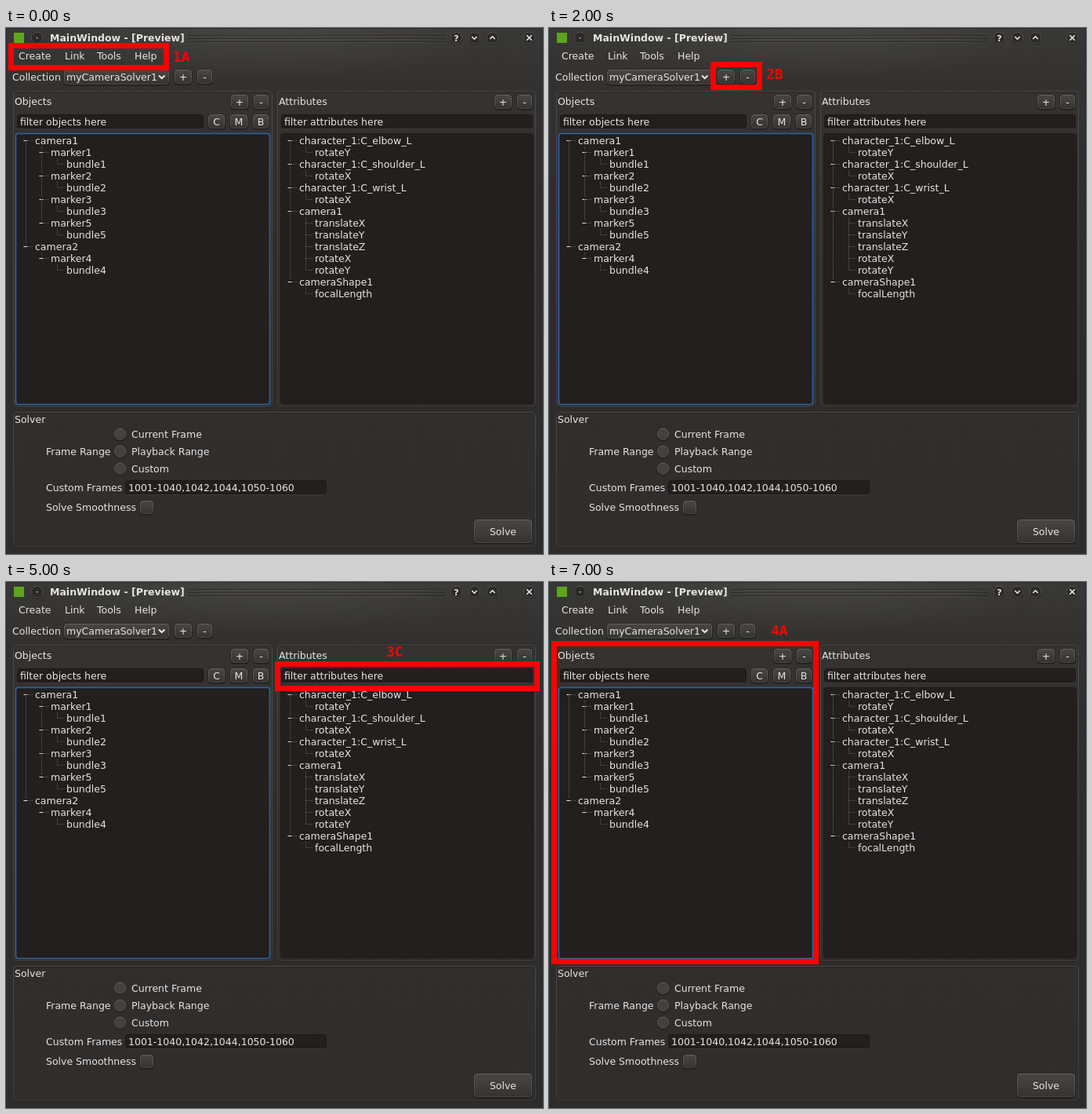
An HTML page for the animation above (8000 ms loop, 685x670 px).

```html
<!DOCTYPE html>
<html>
<head>
<meta charset="utf-8">
<style>
html, body { margin: 0; width: 100%; height: 100%; overflow: hidden; background: #2f2d2c; }
svg { display: block; width: 685px; height: 670px; }
text { font: 12.5px "DejaVu Sans", sans-serif; fill: #e6e5e4; white-space: pre; }
.title { font-weight: bold; }
.tag { font: bold 18px "DejaVu Sans Mono", monospace; fill: #f00; }
.mid { text-anchor: middle; }
.dots { stroke: #62605f; stroke-dasharray: 1 1; fill: none; }
.line { stroke: #eceae9; fill: none; }
</style>
</head>
<body>
<svg id="stage" viewBox="0 0 685 670" xmlns="http://www.w3.org/2000/svg">
  <defs>
    <linearGradient id="win" x2="0" y2="1">
      <stop offset="0" stop-color="#383837"/><stop offset=".12" stop-color="#323130"/>
      <stop offset=".45" stop-color="#2f2d2c"/><stop offset="1" stop-color="#2e2c2b"/>
    </linearGradient>
    <radialGradient id="glow" gradientUnits="userSpaceOnUse" cx="342" cy="0" r="300" gradientTransform="matrix(1 0 0 .22 0 0)">
      <stop offset="0" stop-color="#fff" stop-opacity=".07"/><stop offset="1" stop-color="#fff" stop-opacity="0"/>
    </radialGradient>
    <linearGradient id="btn" x2="0" y2="1">
      <stop offset="0" stop-color="#484645"/><stop offset="1" stop-color="#363433"/>
    </linearGradient>
    <linearGradient id="rim" x2="0" y2="1">
      <stop offset="0" stop-color="#666462"/><stop offset="1" stop-color="#4a4846"/>
    </linearGradient>
    <linearGradient id="frame" x2="0" y2="1">
      <stop offset="0" stop-color="#4b4a49"/><stop offset="1" stop-color="#3f3d3c"/>
    </linearGradient>
    <linearGradient id="rule">
      <stop offset="0" stop-color="#504f4e" stop-opacity="0"/><stop offset=".12" stop-color="#504f4e"/>
      <stop offset=".88" stop-color="#504f4e"/><stop offset="1" stop-color="#504f4e" stop-opacity="0"/>
    </linearGradient>
  </defs>
  <g id="ui"></g>
  <g id="mark">
    <rect id="box" fill="none" stroke="#f00" stroke-width="7"/>
    <text id="tag" class="tag"></text>
  </g>
</svg>
<script>
const NS = 'http://www.w3.org/2000/svg';
const $ = id => document.getElementById(id);
const ui = $('ui');

function set(node, attrs) {
  for (const k in attrs) node.setAttribute(k, attrs[k]);
  return node;
}
const add = (name, attrs) => ui.appendChild(set(document.createElementNS(NS, name), attrs));
const rect = (x, y, width, height, rx, fill, stroke = 'none') =>
  add('rect', { x, y, width, height, rx, fill, stroke });
const path = (d, attrs) => add('path', { d, ...attrs });
const line = (d, width = 1) => path(d, { class: 'line', 'stroke-width': width });
const dots = d => path(d, { class: 'dots' });
function label(x, y, str, cls = '') {
  add('text', { x, y, class: cls }).textContent = str;
}

function button(x, y, w, h, str) {
  rect(x - .5, y - .5, w + 1, h + 2, 4, '#1f1d1c');
  rect(x + .5, y + .5, w - 1, h - 1, 3, 'url(#btn)', 'url(#rim)');
  if (str) label(x + w / 2, y + h / 2 + 5, str, 'mid');
}

function field(x, y, w, h, str) {
  rect(x + .5, y + .5, w - 1, h - 1, 3, '#221f1e', '#1b1918');
  path(`M${x + 3} ${y + h + .5}h${w - 6}`, { stroke: '#3d3b3a' });
  label(x + 4, y + h / 2 + 5, str);
}

function group(x, y, w, h, title, ty) {
  rect(x + .5, y + 1.5, w - 1, h - 1, 4, 'none', '#252322');
  rect(x + .5, y + .5, w - 1, h - 1, 4, '#fff', 'url(#frame)').setAttribute('fill-opacity', .008);
  label(x + 2, ty, title);
}

function list(x, y, w, h, edge, weight = 1) {
  rect(x + .5, y + .5, w - 1, h - 1, 3, '#221f1e', edge).setAttribute('stroke-width', weight);
}

// Each row is its depth followed by its name; rows with children get a minus sign.
function tree(x, rows) {
  const items = rows.map(r => [+r[0], r.slice(1)]);
  items.forEach(([depth, name], i) => {
    const y = 143.5 + i * 15, cx = x + depth * 20 + .5;
    const parent = items[i + 1] && items[i + 1][0] > depth;
    let prev = i - 1;
    while (prev >= 0 && items[prev][0] > depth) prev--;
    if (prev >= 0) {
      const from = 143 + prev * 15 + (items[prev][0] === depth ? 0 : 8);
      dots(`M${cx} ${from}V${y}`);
    }
    dots(`M${cx + (parent ? 3.5 : .5)} ${y}H${cx + 9}`);
    if (parent) {
      rect(cx - 4, y - 3, 7, 6, 0, '#221f1e');
      line(`M${cx - 3} ${y}h5`);
    }
    label(cx + 11.5, y + 4.5, name);
  });
}

function knob(x, glyph) {
  add('circle', { cx: x, cy: 13, r: 8, fill: '#1d1c1b' });
  add('circle', { cx: x, cy: 12.5, r: 7.3, fill: '#2b2a29', stroke: '#5a5856' });
  if (glyph) line(glyph, 1.6);
}

function build() {
  rect(0, 0, 685, 670, 0, 'url(#win)');
  rect(0, 0, 685, 70, 0, 'url(#glow)');
  rect(.5, .5, 684, 669, 3, 'none', '#20303f');

  // title bar
  rect(10, 6, 13, 13, 0, '#5da51c');
  knob(39.5);
  rect(39, 12, 1.4, 1.4, 0, '#e6e5e4');
  label(56, 17, 'MainWindow - [Preview]', 'title');
  for (const y of [9, 13, 17]) {
    rect(232, y, 328, 1, 0, '#222120').setAttribute('opacity', .7);
    rect(232, y + 1, 328, 1, 0, 'url(#rule)');
  }
  knob(574.5);
  label(574.5, 16.5, '?', 'mid title');
  ui.lastChild.style.fontSize = '11px';
  knob(597.5, 'M594.3 11l3.2 3.2l3.2-3.2');
  knob(620.5, 'M617.3 14l3.2-3.2l3.2 3.2');
  knob(667.5, 'M664.3 9.3l6.4 6.4m0-6.4l-6.4 6.4');

  // menu and collection row
  [[16, 'Create'], [75, 'Link'], [116, 'Tools'], [164, 'Help']].forEach(([x, s]) => label(x, 40, s));
  label(8, 67, 'Collection');
  button(74, 53, 134, 19);
  label(77, 67, 'myCameraSolver1');
  line('M195 60.5l3.7 3.7l3.7-3.7', 2);
  button(215, 53, 22, 18, '+');
  button(244, 53, 19, 18, '-');

  group(9, 80, 331, 403, 'Objects', 98);
  group(346, 80, 330, 403, 'Attributes', 98);
  button(287, 85, 22, 18, '+');
  button(316, 85, 19, 18, '-');
  button(623, 85, 22, 18, '+');
  button(652, 85, 19, 18, '-');
  field(14, 110, 238, 18, 'filter objects here');
  button(258, 110, 21, 18, 'C');
  button(286, 110, 22, 18, 'M');
  button(315, 110, 20, 18, 'B');
  field(351, 110, 321, 18, 'filter attributes here');

  list(12, 134, 325, 346, '#2a66a4', 1.6);
  list(350, 134, 323, 345, '#1c1a19');
  tree(25, ['0camera1', '1marker1', '2bundle1', '1marker2', '2bundle2', '1marker3', '2bundle3',
    '1marker5', '2bundle5', '0camera2', '1marker4', '2bundle4']);
  tree(362, ['0character_1:C_elbow_L', '1rotateY', '0character_1:C_shoulder_L', '1rotateX',
    '0character_1:C_wrist_L', '1rotateX', '0camera1', '1translateX', '1translateY', '1translateZ',
    '1rotateX', '1rotateY', '0cameraShape1', '1focalLength']);

  // solver
  group(9, 489, 667, 172, 'Solver', 503);
  label(51, 544, 'Frame Range');
  ['Current Frame', 'Playback Range', 'Custom'].forEach((s, i) => {
    const y = 517.5 + i * 22;
    add('circle', { cx: 145.5, cy: y + .7, r: 8.2, fill: '#1f1d1c' });
    add('circle', { cx: 145.5, cy: y, r: 7.2, fill: '#434140', stroke: 'url(#rim)' });
    label(160, y + 4.5, s);
  });
  label(51, 590, 'Custom Frames');
  field(152, 576, 257, 18, '1001-1040,1042,1044,1050-1060');
  label(51, 615, 'Solve Smoothness');
  button(171, 602, 17, 17);
  button(597, 626, 74, 30, 'Solve');
}

// One second each: left, top, right, bottom, tag, tag x, tag baseline
const steps = [
  [3, 19, 208, 54, '1A', 213, 43],
  [1, 43, 272, 81, '2A', 277, 65],
  [206, 43, 272, 79, '2B', 277, 65],
  [339, 72, 681, 487, '3A', 491, 65],
  [614, 74, 683, 112, '3B', 587, 99],
  [343, 101, 681, 139, '3C', 485, 95],
  [344, 125, 682, 485, '3D', 506, 117],
  [3, 75, 344, 487, '4A', 283, 68]
];

function draw(ms) {
  const [l, t, r, b, str, x, y] = steps[Math.floor(ms / 1000) % steps.length];
  set($('box'), { x: l + 3.5, y: t + 3.5, width: r - l - 7, height: b - t - 7 });
  set($('tag'), { x, y }).textContent = str;
}

build();
const start = performance.now();
function tick() {
  draw(performance.now() - start);
  requestAnimationFrame(tick);
}
draw(0);
requestAnimationFrame(tick);
</script>
</body>
</html>
```
